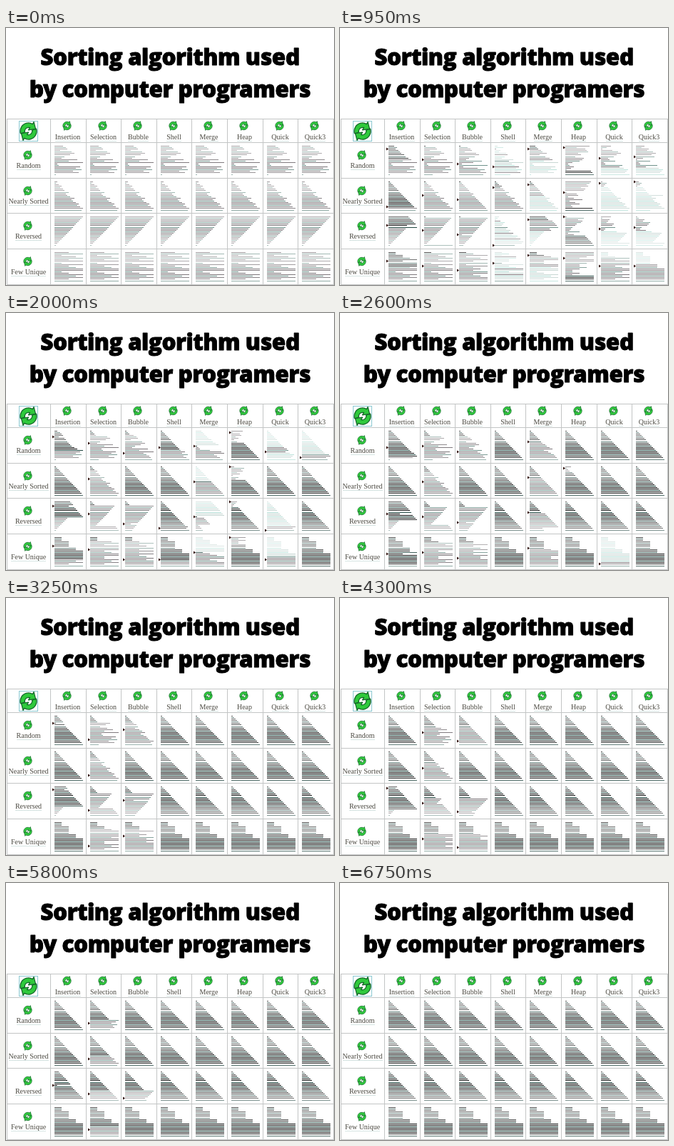
Animation of 460x360 px, one loop 6800 ms. Source, as an HTML page with a canvas:

```html
<!DOCTYPE html>
<html lang="en">
<head>
<meta charset="utf-8">
<title>Sorting algorithms</title>
<style>
html, body { margin: 0; width: 100%; height: 100%; overflow: hidden; background: #fff; }
canvas { display: block; width: 460px; height: 360px; }
</style>
</head>
<body>
<canvas id="stage" width="460" height="360"></canvas>
<script>
const ctx = document.getElementById('stage').getContext('2d');
const LOOP = 6800, TICK = 50, N = 20;
const colX = c => Math.round(62 + 49.6 * c);
const rowY = r => Math.round(160 + 49.7 * r);

// Starting orders
const few = [2, 4, 1, 3, 4, 2, 4, 1, 4, 2, 3, 4, 4, 1, 2, 4, 3, 4, 2, 4];
const rows = [
  { name: 'Random', dark: 13, data: [6, 8, 9, 4, 12, 14, 11, 7, 5, 16, 10, 20, 2, 3, 18, 15, 19, 13, 17, 1] },
  { name: 'Nearly Sorted', dark: 14, data: [2, 1, 3, 5, 4, 6, 7, 10, 8, 9, 11, 14, 12, 13, 15, 17, 16, 18, 20, 19] },
  { name: 'Reversed', dark: 8, data: Array.from({ length: N }, (_, i) => N - i) },
  { name: 'Few Unique', dark: 14, data: few.map(v => v * 5) }
];

const swap = (a, i, j) => { [a[i], a[j]] = [a[j], a[i]]; };
const within = (lo, hi) => i => i >= lo && i <= hi;

// Each sort calls step(pointer, activeTest) once per operation.
function insertion(a, step, done) {
  done[0] = 1;
  for (let i = 1; i < N; i++) {
    done[i] = 1;
    for (let k = i; k > 0; k--) {
      step(k);
      if (a[k] >= a[k - 1]) break;
      swap(a, k, k - 1);
    }
  }
}

function selection(a, step, done) {
  for (let i = 0; i < N; i++) {
    let k = i;
    for (let j = i + 1; j < N; j++) {
      step(j);
      if (a[j] < a[k]) k = j;
    }
    swap(a, i, k);
    done[i] = 1;
  }
}

function bubble(a, step, done) {
  for (let i = 0, moved = true; moved && i < N; i++) {
    moved = false;
    for (let j = N - 1; j > i; j--) {
      step(j);
      if (a[j] < a[j - 1]) {
        swap(a, j, j - 1);
        moved = true;
      }
    }
    done[i] = 1;
  }
}

function shell(a, step, done) {
  for (const h of [13, 4, 1]) {
    for (let s = 0; s < h; s++) {
      const on = i => i % h === s;
      for (let i = s + h; i < N; i += h) {
        if (h === 1) done.fill(1, 0, i + 1);
        for (let k = i; k >= h; k -= h) {
          step(k, on);
          if (a[k] >= a[k - h]) break;
          swap(a, k, k - h);
        }
      }
    }
  }
}

function merge(a, step, done, lo = 0, hi = N - 1) {
  if (lo >= hi) return;
  const mid = (lo + hi) >> 1, on = within(lo, hi);
  merge(a, step, done, lo, mid);
  merge(a, step, done, mid + 1, hi);
  for (let i = lo, j = mid + 1; i <= hi; i++) {
    if (j <= hi && i < j && a[j] < a[i]) a.splice(i, 0, a.splice(j++, 1)[0]);
    done.fill(0);
    done.fill(1, lo, i + 1);
    step(i, on);
  }
}

function heap(a, step, done) {
  const sink = (i, n) => {
    for (let c; (c = 2 * i + 1) < n; i = c) {
      if (c + 1 < n && a[c + 1] > a[c]) c++;
      if (a[c] <= a[i]) return;
      step(i);
      swap(a, i, c);
    }
  };
  for (let i = N / 2 - 1; i >= 0; i--) sink(i, N);
  for (let n = N - 1; n > 0; n--) {
    step(0);
    swap(a, 0, n);
    done[n] = 1;
    sink(0, n);
  }
}

function quick(a, step, done, lo = 0, hi = N - 1) {
  if (lo >= hi) {
    if (lo === hi) done[lo] = 1;
    return;
  }
  const on = within(lo, hi);
  let k = lo;
  swap(a, lo, (lo + hi) >> 1);
  for (let i = lo + 1; i <= hi; i++) {
    step(i, on);
    if (a[i] < a[lo]) swap(a, ++k, i);
  }
  swap(a, lo, k);
  done[k] = 1;
  quick(a, step, done, lo, k - 1);
  quick(a, step, done, k + 1, hi);
}

function quick3(a, step, done, lo = 0, hi = N - 1) {
  if (lo >= hi) {
    if (lo === hi) done[lo] = 1;
    return;
  }
  const on = within(lo, hi);
  swap(a, hi, (lo + hi) >> 1);
  let i = lo, k = lo, p = hi;
  while (i < p) {
    step(i, on);
    if (a[i] < a[hi]) swap(a, i++, k++);
    else if (a[i] === a[hi]) swap(a, i, --p);
    else i++;
  }
  const same = hi - p + 1, m = Math.min(p - k, same);
  for (let q = 0; q < m; q++) swap(a, k + q, hi - m + 1 + q);
  done.fill(1, k, k + same);
  quick3(a, step, done, lo, k - 1);
  quick3(a, step, done, k + same, hi);
}

const cols = [
  ['Insertion', insertion], ['Selection', selection], ['Bubble', bubble], ['Shell', shell],
  ['Merge', merge], ['Heap', heap], ['Quick', quick], ['Quick3', quick3]
];

function record(data, sort) {
  const a = data.slice(), done = Array(N).fill(0), log = [];
  sort(a, (ptr, on) => log.push({ a: a.slice(), done: done.slice(), ptr, on }), done);
  log.push({ a, done: Array(N).fill(1), ptr: -1 });
  return log;
}

const logs = rows.map(r => cols.map(c => record(r.data, c[1])));
const idle = rows.map(r => ({ a: r.data, done: Array(N).fill(0), ptr: -1 }));

function stateAt(r, c, t) {
  const op = Math.floor(c === 0 ? 0.0289 * (t - 170) : 0.0296 * (t - 38));
  if (op < 0) return idle[r];
  const log = logs[r][c];
  return log[Math.min(op, log.length - 1)];
}

function drawBars(r, c, s) {
  const x = colX(c) + 6, top = rowY(r) + 5;
  s.a.forEach((v, i) => {
    const y = top + Math.round(i * 2.08);
    const ink = 0.78 + 0.22 * Math.cos((i - rows[r].dark) * Math.PI / 10);
    const green = i % 3 === 1;
    if (s.on && !s.on(i)) ctx.fillStyle = green ? '#b4ded6' : '#c6d6d2';
    else if (s.done[i]) ctx.fillStyle = green ? '#1f453f' : '#0a0a0a';
    else ctx.fillStyle = green ? '#6f928b' : '#7b7579';
    ctx.globalAlpha = ink;
    ctx.fillRect(x, y, v * 2, 1);
  });
  ctx.globalAlpha = 1;
  if (s.ptr >= 0) {
    const y = top + Math.round(s.ptr * 2.08) + 0.5;
    ctx.fillStyle = '#2a0c08';
    ctx.beginPath();
    ctx.moveTo(x - 3, y - 2);
    ctx.lineTo(x, y);
    ctx.lineTo(x - 3, y + 2);
    ctx.fill();
  }
}

// Two green arrows chasing each other
function drawIcon(x, y, size) {
  ctx.save();
  ctx.translate(x, y);
  ctx.scale(size / 24, size / 24);
  ctx.rotate(-0.35);
  ctx.lineJoin = 'round';
  for (let i = 0; i < 2; i++) {
    ctx.rotate(Math.PI);
    ctx.beginPath();
    ctx.arc(0, 0, 11.5, Math.PI * 1.02, Math.PI * 1.78);
    ctx.lineTo(11.5, -9.5);
    ctx.lineTo(10.5, 0.5);
    ctx.lineTo(0.5, -1.5);
    ctx.lineTo(3.6, -4);
    ctx.arc(0, 0, 5.2, Math.PI * 1.7, Math.PI * 1.02, true);
    ctx.closePath();
    ctx.fillStyle = '#2fc93c';
    ctx.fill();
    ctx.strokeStyle = '#14682a';
    ctx.lineWidth = 1.3;
    ctx.stroke();
  }
  ctx.restore();
}

function label(text, x, y) {
  ctx.font = '10px "Liberation Serif", "Times New Roman", serif';
  ctx.fillStyle = '#4c4a42';
  ctx.fillText(text, x, y);
  const w = Math.round(ctx.measureText(text).width);
  ctx.fillStyle = '#d5e4e2';
  ctx.fillRect(Math.round(x - w / 2), y + 2, w, 1);
}

const titleFont = px => `800 ${px}px "Open Sans", "Noto Sans", Roboto, sans-serif`;
const title = ['Sorting algorithm used', 'by computer programers'];

function drawTitle() {
  ctx.save();
  ctx.fontStretch = 'condensed';
  ctx.letterSpacing = '-0.5px';
  ctx.font = titleFont(40);
  const px = Math.min(41, 40 * 366 / ctx.measureText(title[0]).width);
  ctx.font = titleFont(px);
  ctx.fillStyle = ctx.strokeStyle = '#000';
  ctx.lineWidth = 0.9;
  ctx.lineJoin = 'round';
  title.forEach((line, i) => {
    ctx.fillText(line, 230, 52 + 45 * i);
    ctx.strokeText(line, 230, 52 + 45 * i);
  });
  ctx.restore();
}

function drawTable() {
  ctx.fillStyle = '#c3c5c5';
  for (const y of [127, 160, 210, 259, 309, 359]) ctx.fillRect(1, y, 459, 1);
  ctx.fillRect(1, 127, 1, 233);
  for (let c = 0; c <= 8; c++) ctx.fillRect(colX(c), 127, 1, 233);
  ctx.strokeStyle = '#8cc9d2';
  ctx.lineWidth = 1;
  ctx.strokeRect(18.5, 130.5, 26, 28);
  drawIcon(31.5, 144.5, 24);
  cols.forEach((c, i) => {
    const x = colX(i) + 24.5;
    drawIcon(x - 1, 137, 12);
    label(c[0], x, 156);
  });
  rows.forEach((r, i) => {
    drawIcon(30.5, rowY(i) + 18, 12);
    label(r.name, 31.5, rowY(i) + 36);
  });
}

function draw(now) {
  const t = Math.floor((now % LOOP) / TICK) * TICK;
  ctx.fillStyle = '#fff';
  ctx.fillRect(0, 0, 460, 360);
  ctx.textAlign = 'center';
  drawTitle();
  drawTable();
  rows.forEach((_, r) => cols.forEach((_, c) => drawBars(r, c, stateAt(r, c, t))));
}

let start = null;
function loop(now) {
  if (start === null) start = now;
  draw(Math.max(0, now - start));
  requestAnimationFrame(loop);
}
draw(0);
requestAnimationFrame(loop);
</script>
</body>
</html>
```
